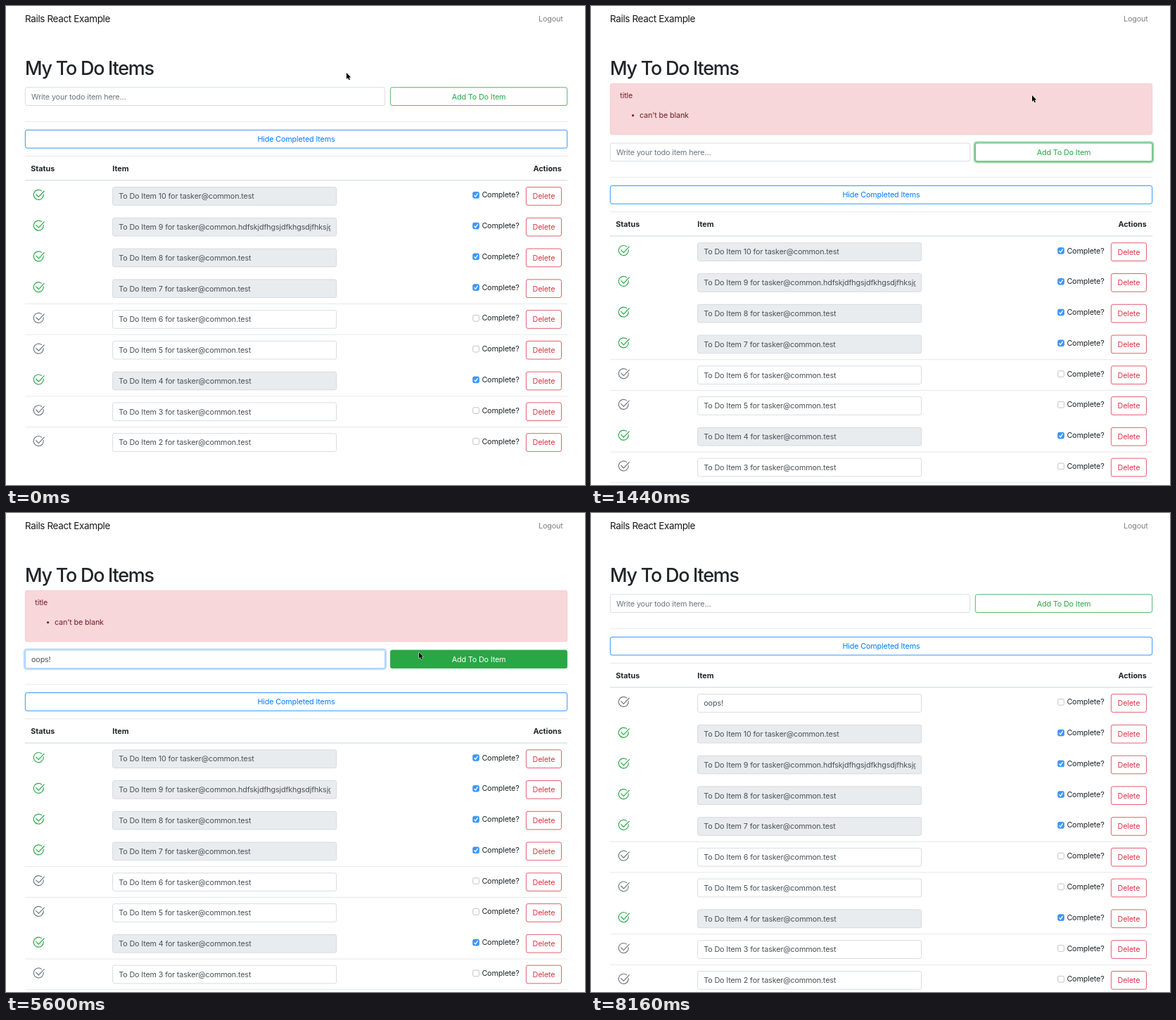
An HTML page that plays this animation: 823x681 px, repeating every 8320 ms.

```html
<!DOCTYPE html>
<html lang="en">
<head>
<meta charset="utf-8">
<title>To do list</title>
<style>
  html, body { margin: 0; width: 100%; height: 100%; overflow: hidden; background: #fff; }
  svg { display: block; }
  text {
    font: 10.78px Inter, "Liberation Sans", sans-serif;
    font-optical-sizing: none;
    letter-spacing: -.013em;
    white-space: pre;
  }
  .brand { font-size: 13.5px; letter-spacing: -.027em; }
  .title { font-size: 26.95px; font-weight: 500; letter-spacing: -.046em; }
  .head { font-weight: 700; letter-spacing: -.002em; }
</style>
</head>
<body>
<svg id="stage" width="823" height="681" viewBox="0 0 823 681"></svg>
<script>
const LOOP = 8320, STEP = 160;
const ALERT_HEIGHT = 79.2, ROW_HEIGHT = 43.77, CONTROL_HEIGHT = 26.4;
const LEFT = 27, RIGHT = 798;
const GREEN = '#28a745', BLUE = '#007bff', RED = '#dc3545';
const GRAY = '#6c757d', INK = '#212529', FIELD_INK = '#495057', LINE = '#dee2e6';

const stage = document.getElementById('stage');

// Pointer legs: start time, end time, from, to.
const legs = [
  [0, 1120, [484, 95], [627, 127]],
  [1600, 2240, [627, 127], [268, 206]],
  [5120, 5920, [458, 185], [657, 205]],
  [7260, 7840, [657, 205], [640, -14]],
];

const typing = [[3680, 'oo'], [4000, 'oop'], [4160, 'oops'], [4800, 'oops!'], [6240, '']];

const items = [10, 9, 8, 7, 6, 5, 4, 3, 2].map(n => ({
  text: `To Do Item ${n} for tasker@common.` + (n === 9 ? 'hdfskjdfhgsjdfkhgsdjfhksjgdfkh' : 'test'),
  done: n > 6 || n === 4,
}));
const longList = [{ text: 'oops!', done: false }, ...items];

const between = (t, a, b) => t >= a && t < b;
const inside = (p, b) => between(p.x, b.x, b.x + b.w) && between(p.y, b.y, b.y + CONTROL_HEIGHT);

function text(x, y, str, fill = INK, extra = '') {
  return `<text x="${x}" y="${y}" fill="${fill}" ${extra}>${str}</text>`;
}

function box(b, fill, stroke, radius = 2.6, h = CONTROL_HEIGHT) {
  return `<rect x="${b.x + .35}" y="${b.y + .35}" width="${b.w - .7}" height="${h - .7}"
    rx="${radius}" fill="${fill}" stroke="${stroke}" stroke-width=".8"/>`;
}

function ring(b, color, opacity) {
  return `<rect x="${b.x - 1.1}" y="${b.y - 1.1}" width="${b.w + 2.2}" height="${CONTROL_HEIGHT + 2.2}"
    rx="3.5" fill="none" stroke="${color}" stroke-opacity="${opacity}" stroke-width="2.2"/>`;
}

function rule(y, color = LINE, width = .8) {
  return `<path d="M${LEFT} ${y}H${RIGHT}" stroke="${color}" stroke-width="${width}"/>`;
}

function button(b, label, color, hover = false, focus = false) {
  return (focus ? ring(b, color, .5) : '')
    + box(b, hover ? color : '#fff', color)
    + text(b.x + b.w / 2, b.y + 17.1, label, hover ? '#fff' : color, 'text-anchor="middle"');
}

function statusIcon(y, color) {
  return `<g transform="translate(46.3 ${y})" fill="none" stroke="${color}" stroke-width="1.15"
      stroke-linecap="round" stroke-linejoin="round">
    <path d="M4.2 -5.6A7 7 0 1 0 6.9 -.9"/><path d="M-3.7 -.8L.1 3L8 -5.4"/></g>`;
}

function checkbox(y, checked) {
  const b = { x: 663.3, y, w: 9.4 };
  return checked
    ? box(b, '#3b99fc', '#2f8df2', 1.8, 9.4)
      + `<path d="M665.5 ${y + 4.9}l1.9 2.1 3.2 -4.7" fill="none" stroke="#fff" stroke-width="1.3"/>`
    : box(b, '#fff', '#b4b4b4', 1.8, 9.4);
}

function row(item, i, top) {
  const y = top + i * ROW_HEIGHT;
  const field = { x: 151.3, y: y + 8.9, w: 318.7 };
  return (item.done || !i ? '' : rule(y + .1))
    + statusIcon(y + 20.1, item.done ? GREEN : GRAY)
    + box(field, item.done ? '#e9ecef' : '#fff', '#ced4da')
    + `<svg x="0" y="${field.y}" width="461.4" height="${CONTROL_HEIGHT}">`
    + text(160.3, 17.1, item.text, FIELD_INK) + '</svg>'
    + checkbox(y + 15.8, item.done)
    + text(676.4, y + 24.1, 'Complete?')
    + button({ x: 739, y: field.y, w: 50.8 }, 'Delete', RED);
}

function alertBox() {
  return box({ x: LEFT, y: 110, w: RIGHT - LEFT }, '#f8d7da', '#f5c6cb', 2.6, 73.2)
    + text(41.3, 131.2, 'title', '#721c24')
    + '<circle cx="59.6" cy="155.6" r="1.6" fill="#721c24"/>'
    + text(69, 159.1, "can't be blank", '#721c24');
}

function pointerAt(t) {
  const [start, end, from, to] = legs.filter(leg => leg[0] <= t).pop();
  const p = Math.min(1, (t - start) / (end - start));
  const k = p * p * (3 - 2 * p);
  return { x: from[0] + (to[0] - from[0]) * k, y: from[1] + (to[1] - from[1]) * k };
}

function pointer({ x, y }, beam) {
  const shape = beam
    ? '<path d="M-2.3 -4.8Q0 -4.8 0 -3.4Q0 -4.8 2.3 -4.8M0 -3.4V3.8M-2.3 5.2Q0 5.2 0 3.8Q0 5.2 2.3 5.2" fill="none" stroke="#111" stroke-width=".9"/>'
    : '<path d="M0 0V8.9L2 7.1L3.4 10.3L4.9 9.7L3.6 6.5H6.3Z" stroke="#fff" stroke-width="1" paint-order="stroke"/>';
  return `<g transform="translate(${x} ${y})">${shape}</g>`;
}

function render(t) {
  const failed = between(t, 1440, 6400);
  const shift = failed ? ALERT_HEIGHT : 0;
  const typed = typing.filter(k => k[0] <= t).pop() || [2240, ''];
  const editing = between(t, 2240, 5920);
  const addFocused = between(t, 1280, 2240) || between(t, 5920, 8160);
  const cursor = pointerAt(t);

  const input = { x: LEFT, y: 115.4 + shift, w: 512 };
  const add = { x: 546, y: input.y, w: 252 };
  const hide = { x: LEFT, y: 176 + shift, w: RIGHT - LEFT };
  const value = typed[1];

  let out = text(LEFT, 22.9, 'Rails React Example', '#191919', 'class="brand"')
    + text(757, 22.2, 'Logout', '#7f7f7f')
    + text(LEFT, 98.2, 'My To Do Items', INK, 'class="title"')
    + (failed ? alertBox() : '')
    + (editing ? ring(input, BLUE, .25) : '')
    + box(input, '#fff', editing ? '#80bdff' : '#ced4da')
    + text(36, input.y + 17.1, value || 'Write your todo item here...', value ? FIELD_INK : GRAY, 'id="value"')
    + button(add, 'Add To Do Item', GREEN, inside(cursor, add), addFocused)
    + rule(164.4 + shift, '#e5e5e5')
    + button(hide, 'Hide Completed Items', BLUE, inside(cursor, hide))
    + rule(213.5 + shift)
    + text(35.3, 234.8 + shift, 'Status', INK, 'class="head"')
    + text(151.3, 234.8 + shift, 'Item', INK, 'class="head"')
    + text(789.7, 234.8 + shift, 'Actions', INK, 'class="head" text-anchor="end"')
    + rule(247.8 + shift, LINE, 1.4)
    + (t < 6400 ? items : longList).map((item, i) => row(item, i, 248.3 + shift)).join('');

  if (!between(t, 3680, 5120)) out += pointer(cursor, inside(cursor, input));
  stage.innerHTML = out;

  if (editing && (t - typed[0]) % 960 < 480) {
    const width = value ? document.getElementById('value').getComputedTextLength() : 0;
    stage.insertAdjacentHTML('beforeend',
      `<rect x="${36 + width}" y="${input.y + 6.6}" width=".8" height="12.6" fill="#222"/>`);
  }
}

let shown = -1;
function tick() {
  const t = Math.floor(performance.now() % LOOP / STEP) * STEP;
  if (t !== shown) render(shown = t);
  requestAnimationFrame(tick);
}
tick();
</script>
</body>
</html>
```
